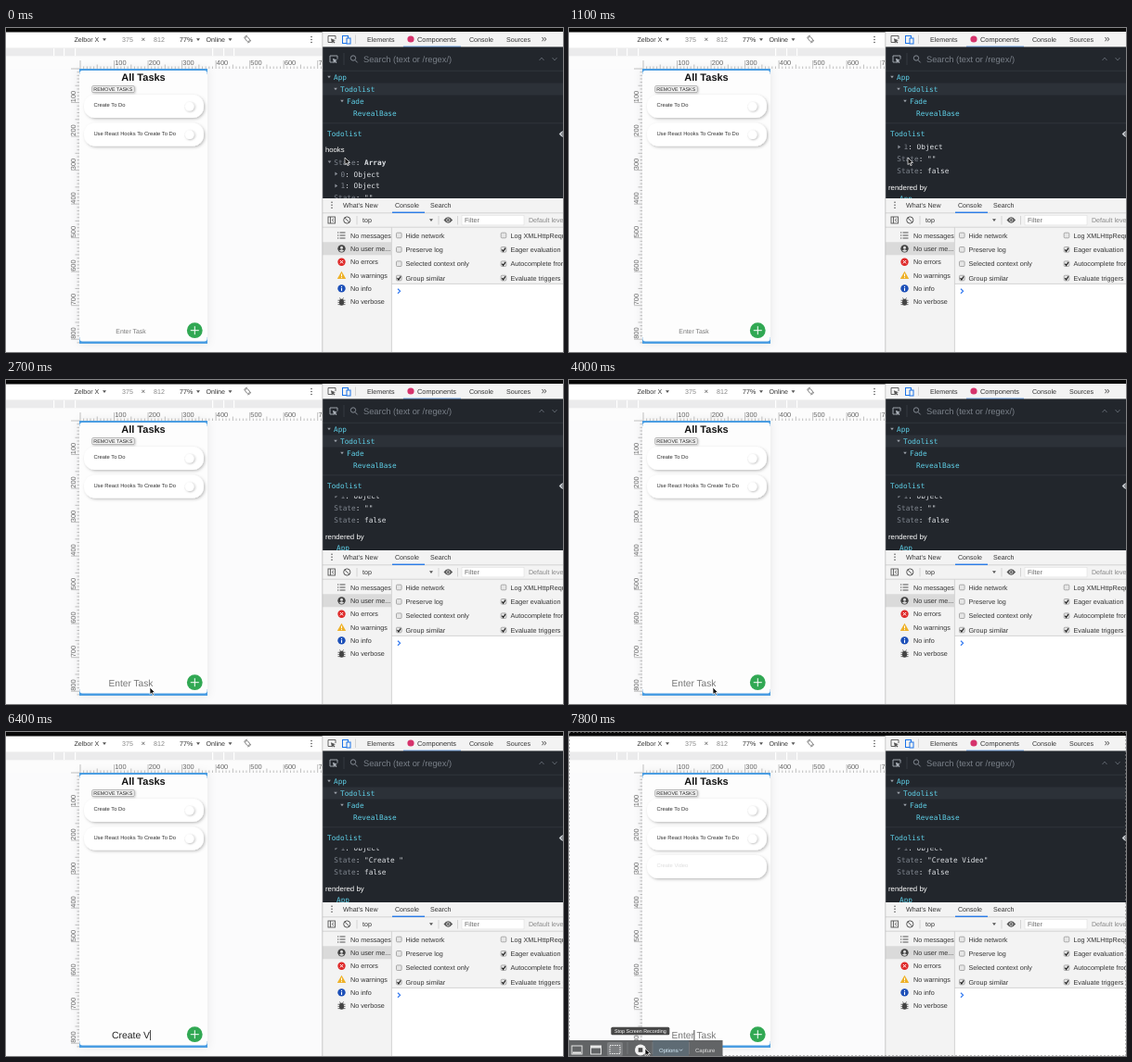
Write an HTML page that moves like this. It is 600 px wide and 350 px high and loops after 7900 ms.

```html
<!DOCTYPE html>
<html lang="en">
<head>
<meta charset="utf-8">
<title>Todo list with component inspector</title>
<style>
  html, body { margin: 0; width: 100%; height: 100%; overflow: hidden; background: #fff; }
  svg { display: block; width: 600px; height: 350px; }
  text { font-family: "Liberation Sans", Arial, sans-serif; white-space: pre; text-rendering: geometricPrecision; }
  .mono { font-family: "DejaVu Sans Mono", monospace; }
</style>
</head>
<body>
<svg id="stage" viewBox="0 0 600 350" xmlns="http://www.w3.org/2000/svg"></svg>
<script>
const LOOP = 7900;
const SCALE = 0.3653; // screen px per device px
const CYAN = '#5fd0e8', INK = '#333', DIM = '#7f858e', PALE = '#dfe2e6';

// ---- markup helpers ----
const rect = (x, y, w, h, fill, more = '') =>
  `<rect x="${x}" y="${y}" width="${w}" height="${h}" fill="${fill}" ${more}/>`;
const circle = (x, y, r, fill, more = '') =>
  `<circle cx="${x}" cy="${y}" r="${r}" fill="${fill}" ${more}/>`;
const path = (d, stroke, width = 1, more = 'fill="none"') =>
  `<path d="${d}" stroke="${stroke}" stroke-width="${width}" ${more}/>`;
const shape = (d, fill) => `<path d="${d}" fill="${fill}"/>`;
const text = (x, y, str, size = 7.1, fill = INK, more = '') =>
  `<text x="${x}" y="${y}" font-size="${size}" fill="${fill}" ${more}>${str}</text>`;
const mono = (x, y, str, fill = CYAN, more = '') =>
  text(x, y, str, 7.75, fill, `class="mono" ${more}`);
const down = (x, y, fill, r = 2) => shape(`M${x - r} ${y - r * .6}h${2 * r}l${-r} ${r * 1.4}z`, fill);
const right = (x, y, fill) => shape(`M${x - 1.1} ${y - 2}l2.8 2l-2.8 2z`, fill);
const dots = (x, y) => [-3, 0, 3].map(d => circle(x, y + d, .8, '#555')).join('');
const inspect = (x, y, c) =>
  path(`M${x + 1} ${y + 3.5}h-4.5v-7h8v3.5`, c, .9) +
  shape(`M${x - .6} ${y - .8}l5 2l-2 .8l1.6 1.6l-1 1l-1.6 -1.6l-.8 1.8z`, c);
const eye = (x, y, c, hole) =>
  shape(`M${x - 4.8} ${y}q4.8 -6.4 9.6 0q-4.8 6.4 -9.6 0z`, c) +
  circle(x, y, 1.7, c, `stroke="${hole}" stroke-width=".8"`);

// ---- left side ----
function toolbar() {
  const guides = [51, 62, 74, 222, 234, 245].map(x => rect(x, 22, 1.2, 8, '#fff')).join('');
  return rect(0, 0, 341, 350, '#fbfbfc') + rect(0, 4, 341, 17, '#fff') +
    text(73.5, 15, 'Zelbor X') + down(106, 12.5, '#555') +
    text(125, 15, '375', 7.1, '#888') + text(145.5, 15, '×', 8, '#555') + text(159, 15, '812', 7.1, '#888') +
    text(187, 15, '77%') + down(207, 12.5, '#555') +
    text(215.5, 15, 'Online') + down(241.5, 12.5, '#555') +
    `<g transform="rotate(-40 260 12)">${rect(258.3, 9.5, 3.4, 5.2, 'none', 'rx="1" stroke="#666" stroke-width=".8"')}</g>` +
    path('M256.5 11a4 4 0 0 1 3.5 -3M263.8 13a4 4 0 0 1 -3.5 3', '#666', .7) + dots(329, 12.5) +
    rect(0, 21.5, 341, 9, '#ebebec') + guides + rect(0, 30.5, 341, 13.5, '#fcfcfc');
}

function rulers() {
  let d = '', labels = '';
  for (let i = 0; i <= 81; i++) {
    const len = i % 10 ? (i % 5 ? 2.5 : 4.5) : 9, at = i * 10 * SCALE;
    if (80 + at < 340) d += `M${80 + at} 44v${-len}`;
    d += `M79 ${44 + at}h${-len}`;
    if (i && i % 10 === 0) {
      if (80 + at < 340) labels += text(80.7 + at, 40, i * 10, 7.4, '#666');
      labels += text(0, 0, i * 10, 7.4, '#666', `transform="translate(75 ${43.6 + at}) rotate(-90)"`);
    }
  }
  return path(d, '#999', .6) + labels;
}

const card = (y, label, more = '', toggle = true) =>
  `<g ${more}>` + rect(84, y, 129, 25, '#fff', 'rx="12" filter="url(#soft)"') +
  (toggle ? rect(192, y + 8, 14, 10, '#fafafa', 'rx="5"') +
    circle(197.7, y + 12.8, 4.8, '#fff', 'filter="url(#knob)"') : '') +
  text(94.4, y + 13.2, label, 5.82, INK, toggle ? '' : 'id="label"') + '</g>';

function phone() {
  return rect(79, 44, 138, 297, '#fdfdfd', 'filter="url(#glow)"') +
    rect(79, 44, 138, 6, '#4a9de2') + rect(79, 334, 138, 7, '#4a9de2') +
    rect(79.3, 46, 137.4, 292.4, '#fdfdfd', 'rx="3"') +
    text(148, 57.4, 'All Tasks', 11, '#111', 'font-weight="bold" text-anchor="middle"') +
    rect(92.8, 62.6, 45.4, 7, '#f4f4f4', 'rx="1" stroke="#999" stroke-width=".7" filter="url(#knob)"') +
    text(115.3, 68.1, 'REMOVE TASKS', 5.4, '#222', 'text-anchor="middle"') +
    card(72, 'Create To Do') + card(102.5, 'Use React Hooks To Create To Do') +
    card(133, 'Create Video', 'id="added"', false) +
    text(134.5, 331, '', 10.2, '#777', 'id="field" text-anchor="middle"') +
    rect(0, 322, .8, 11, '#222', 'id="caret"') +
    circle(203.3, 326.7, 8.4, '#31a853') + path('M203.3 322.2v9M198.8 326.7h9', '#fff', 1);
}

// ---- right side ----
function tabs() {
  return rect(341, 4, 259, 16.5, '#f3f3f3') + inspect(350.5, 12, '#555') +
    rect(362.5, 8.5, 6, 8, 'none', 'stroke="#1a73e8" stroke-width="1"') +
    rect(367, 11, 4, 6, '#f3f3f3', 'stroke="#1a73e8" stroke-width="1"') +
    path('M376.5 7.5v9.5', '#ccc', .8) +
    text(389, 14.7, 'Elements') + circle(436, 12, 3.6, '#d6336c') +
    text(443, 14.7, 'Components', 7.4) + text(499, 14.7, 'Console') + text(539, 14.7, 'Sources') +
    text(576.5, 15.2, '»', 11, '#555') + rect(428, 19.7, 62, .8, '#1a73e8');
}

function tree() {
  const rows = [[353, 'App', 1], [360, 'Todolist', 1], [367, 'Fade', 1], [374, 'RevealBase', 0]];
  return rect(341, 20.4, 259, 164, '#22262c') + rect(341, 59.5, 259, 13, '#2c3138') +
    inspect(352.5, 33.5, '#aab0b8') + path('M364 27v13', '#3b4048', .8) +
    circle(374, 32.5, 2.7, 'none', 'stroke="#858b94" stroke-width="1"') + path('M376 34.6l2.6 2.8', '#858b94', 1) +
    text(385, 36.8, 'Search (text or /regex/)', 9.3, '#7a8089') +
    path('M574.5 35l2.5 -3l2.5 3M588.5 32l2.5 3l2.5 -3', '#5c626b', 1) +
    path('M341 46.3h259M341 102.8h259', '#343941', .8) +
    rows.map(([x, name, open], i) => (open ? down(x - 5, 52.8 + i * 13, '#9aa0a8', 1.8) : '') +
      mono(x, 55.8 + i * 13, name)).join('') +
    mono(346, 117, 'Todolist') + eye(600.5, 114.5, '#cdd1d6', '#22262c');
}

function hooks() {
  const pair = (x, y, key, val, more = '') =>
    mono(x, y, `<tspan fill="${DIM}">${key}</tspan>: <tspan ${more}>${val}</tspan>`, PALE);
  return `<clipPath id="pane"><rect x="341" y="125.5" width="259" height="58.5"/></clipPath>
    <g clip-path="url(#pane)"><g id="scroll">` +
    text(344, 134.4, 'hooks', 7.7, '#fff') +
    down(348.5, 144.6, '#8b9099', 1.8) + pair(353.3, 148, 'State', 'Array', 'font-weight="bold"') +
    right(355.5, 157.6, '#8b9099') + pair(360.6, 160.6, '0', 'Object') +
    right(355.5, 170.4, '#8b9099') + pair(360.6, 173.4, '1', 'Object') +
    pair(353.3, 186.2, 'State', '', 'id="value"') + pair(353.3, 198.9, 'State', 'false') +
    text(344, 217.2, 'rendered by', 7.8, '#fff') + mono(356, 229.2, 'App') + '</g></g>';
}

function sidebarIcon(i, y) {
  const x = 361.5;
  return [
    () => path(`M${x - 2} ${y - 3}h6M${x - 2} ${y}h6M${x - 2} ${y + 3}h6M${x - 4.5} ${y - 3}h1.3M${x - 4.5} ${y}h1.3M${x - 4.5} ${y + 3}h1.3`, '#555', 1.1),
    () => circle(x, y, 4.2, '#444') + circle(x, y - 1.2, 1.5, '#ddd') + shape(`M${x - 2.6} ${y + 2.4}q2.6 -3 5.2 0q-2.6 2 -5.2 0z`, '#ddd'),
    () => circle(x, y, 4.2, '#df2a2a') + path(`M${x - 1.7} ${y - 1.7}l3.4 3.4m0 -3.4l-3.4 3.4`, '#fff', 1),
    () => shape(`M${x} ${y - 4.2}l4.7 8.2h-9.4z`, '#eeb127') + path(`M${x} ${y - 1.5}v2.8m0 .8v1`, '#fff', 1),
    () => circle(x, y, 4.2, '#1c4fb8') + path(`M${x} ${y - 2.4}v1.2m0 .9v2.8`, '#fff', 1.1),
    () => rect(x - 2.4, y - 3, 4.8, 7, '#444', 'rx="2.3"') +
      path(`M${x - 4} ${y - 1.5}h8M${x - 4} ${y + .7}h8M${x - 4} ${y + 2.9}h8M${x - 2} ${y - 4.3}l1 1.5m2 0l1 -1.5`, '#444', .8),
  ][i]();
}

function drawer() {
  const list = ['No messages', 'No user me...', 'No errors', 'No warnings', 'No info', 'No verbose'];
  const options = [
    ['Hide network', 0, 'Log XMLHttpRequests', 0], ['Preserve log', 0, 'Eager evaluation', 1],
    ['Selected context only', 0, 'Autocomplete from history', 1], ['Group similar', 1, 'Evaluate triggers user', 1]];
  const box = (x, y, on) =>
    rect(x - 2.8, y - 2.8, 5.6, 5.6, '#e6e6e6', 'rx="1" stroke="#999" stroke-width=".8"') +
    (on ? path(`M${x - 1.8} ${y}l1.4 1.8l2.4 -3.6`, '#222', 1.2) : '');
  return rect(341, 184, 259, 166, '#f3f3f3') + dots(351, 191.3) +
    text(363, 193.9, 'What\'s New') + text(419, 193.9, 'Console') + text(457, 193.9, 'Search') +
    path('M341 199.8h259M341 215.2h259', '#ccc', .8) + rect(416, 198.6, 35, 1.3, '#1a73e8') +
    rect(347, 204, 7.5, 7, 'none', 'stroke="#555" stroke-width=".9"') + path('M349.5 204v7M353 205.8l-1.8 1.7l1.8 1.7', '#555', .9) +
    circle(367.3, 207.5, 3.6, 'none', 'stroke="#555" stroke-width="1"') + path('M364.8 205l5 5', '#555', 1) +
    path('M378 203v9.5M466 203v9.5M486.5 203v9.5', '#ccc', .8) +
    text(384, 210, 'top') + down(458, 207.5, '#555') + eye(476.3, 207.5, '#555', '#f3f3f3') +
    rect(491, 202.3, 67, 10.6, '#fff', 'stroke="#e2e2e2" stroke-width=".7"') +
    text(494, 210, 'Filter', 7.1, '#666') + text(563, 210, 'Default levels', 7.1, '#888') +
    rect(341, 231.3, 74, 14, '#dadada') +
    list.map((s, i) => sidebarIcon(i, 224 + i * 14.35) + text(371, 226.6 + i * 14.35, s, 7.2)).join('') +
    rect(415.5, 276.5, 185, 74, '#fff') + path('M415.4 215.5V350M415.4 276.4H600', '#ccc', .8) +
    options.map(([a, on, b, on2], i) => {
      const y = 224 + i * 15.35;
      return box(423.3, y, on) + text(430.5, y + 2.5, a, 7.2) + box(536, y, on2) + text(543.5, y + 2.5, b, 7.2);
    }).join('') +
    path('M422 281.7l2.6 2.5l-2.6 2.5', '#367cf1', 1.2) + path('M340.8 4V350', '#bbb', .8);
}

// ---- recorder overlay and pointer ----
function recorder() {
  const frame = 'M0 .5H600M0 349.5H600M.5 0V350M599.5 0V350';
  return '<g id="recorder">' +
    path(frame, '#888', .8, 'fill="none" stroke-dasharray="2 2" opacity=".7"') +
    rect(0, 333, 165.5, 17, '#626466') + rect(90, 333, 39, 17, '#5e6b74') +
    path('M63 335v13M90 335v13M129.5 335v13', '#808285', .7) +
    rect(3, 339, 11, 9, 'none', 'stroke="#e6e6e6"') + rect(4, 345.5, 9, 2, '#e6e6e6') +
    rect(23.5, 339, 11, 9, 'none', 'stroke="#e6e6e6"') + rect(23.5, 339, 11, 2.5, '#e6e6e6') +
    rect(41, 335, 17, 15, '#7d7f81', 'rx="2"') +
    rect(44, 338.5, 11, 9, 'none', 'stroke="#f2f2f2" stroke-dasharray="1.5 1"') +
    circle(77, 343.5, 6, '#f2f2f2') + rect(74.7, 341.2, 4.6, 4.6, '#4a4a4a') +
    text(97, 345.7, 'Options', 6, '#d8eefb') + path('M119 342.7l1.6 1.6l1.6 -1.6', '#d8eefb', .8) +
    text(136, 345.7, 'Capture', 6, '#e2e2e2') +
    '<g id="tip">' + rect(45.3, 318.8, 63, 8.4, '#484848', 'rx="1.5"') +
    text(76.9, 325, 'Stop Screen Recording', 5.4, '#fff', 'text-anchor="middle"') + '</g></g>';
}

const pointers =
  '<g id="arrow">' + path('M0 0V7.6L1.8 6L3 8.7L4.3 8.1L3.1 5.5H5.5Z', '#fff', .7, 'fill="#111"') + '</g>' +
  '<g id="beam">' + path('M-2 -3.5q2 0 2 1.2q0 -1.2 2 -1.2M0 -3V3M-2 3.5q2 0 2 -1.2q0 1.2 2 1.2M-1.3 0h2.6', '#eee', 1) + '</g>';

const shadow = (id, dx, dy, blur, alpha) =>
  `<filter id="${id}" x="-40%" y="-40%" width="180%" height="190%">
    <feDropShadow dx="${dx}" dy="${dy}" stdDeviation="${blur}" flood-color="#000" flood-opacity="${alpha}"/></filter>`;

const stage = document.getElementById('stage');
stage.innerHTML = '<defs>' + shadow('soft', 1.3, 1.3, 1.7, .26) + shadow('knob', .8, .8, .9, .26) +
  shadow('glow', 0, 0, 5, .09) + '</defs>' +
  toolbar() + rect(0, 0, 600, 4.5, '#080808') +
  phone() + rulers() + tabs() + tree() + hooks() + drawer() + recorder() + pointers;

// ---- motion ----
const ui = {};
stage.querySelectorAll('[id]').forEach(e => ui[e.id] = e);

const scrollKeys = [[100, 0], [600, 28], [1100, 42], [1300, 45]];
const xKeys = [[1300, 365], [1600, 262], [1900, 180], [2100, 155], [7400, 155], [7700, 82]];
const yKeys = [[1300, 140], [1600, 250], [1900, 318], [2100, 332], [7400, 332], [7700, 342]];
const sizeKeys = [[2300, 6.9], [2600, 10.2]];
const typed = 'Create Video';
const strokes = [5100, 5400, 5600, 5700, 5800, 6000, 6100, 6400, 6600, 6700, 6900, 7000];
const polls = [5400, 6400, 7400]; // inspector refreshes once a second
const SUBMIT = 7400;

function mix(keys, t) {
  const i = keys.findIndex(k => k[0] > t);
  if (i === 0) return keys[0][1];
  if (i < 0) return keys[keys.length - 1][1];
  const [t0, a] = keys[i - 1], [t1, b] = keys[i];
  return a + (b - a) * (t - t0) / (t1 - t0);
}
const count = t => strokes.filter(s => s <= t).length;
const show = (e, on) => e.setAttribute('display', on ? 'inline' : 'none');

function draw(t) {
  ui.scroll.setAttribute('transform', `translate(0 ${-mix(scrollKeys, t)})`);

  const entry = t < SUBMIT ? typed.slice(0, count(t)) : '';
  const size = mix(sizeKeys, t);
  ui.field.textContent = entry || 'Enter Task';
  ui.field.setAttribute('fill', entry ? '#222' : '#777');
  ui.field.setAttribute('font-size', entry ? 10.4 : size);
  ui.field.setAttribute('y', 327 + size * .42);
  ui.caret.setAttribute('x', 134.5 + (entry ? ui.field.getComputedTextLength() / 2 : 0));
  show(ui.caret, t >= 4700 ? t >= 5100 : t >= 3100 && (t < 3600 || t >= 4100));

  const poll = polls.filter(p => p <= t).pop();
  // each refresh lands just before the key typed at the same moment
  ui.value.textContent = `"${poll ? typed.slice(0, count(poll - 50)) : ''}"`;

  show(ui.added, t >= SUBMIT);
  ui.label.setAttribute('opacity', Math.max(0, t - SUBMIT) * .0004);
  show(ui.recorder, t >= 7200);
  show(ui.tip, t >= 7600);

  const beam = t >= 400 && t < 900;
  const place = `translate(${mix(xKeys, t)} ${mix(yKeys, t)})`;
  ui.arrow.setAttribute('transform', place);
  ui.beam.setAttribute('transform', place);
  show(ui.beam, beam);
  show(ui.arrow, !beam && (t < 5000 || t >= 7300));
}

function tick() {
  draw(performance.now() % LOOP);
  requestAnimationFrame(tick);
}
tick();
</script>
</body>
</html>
```
